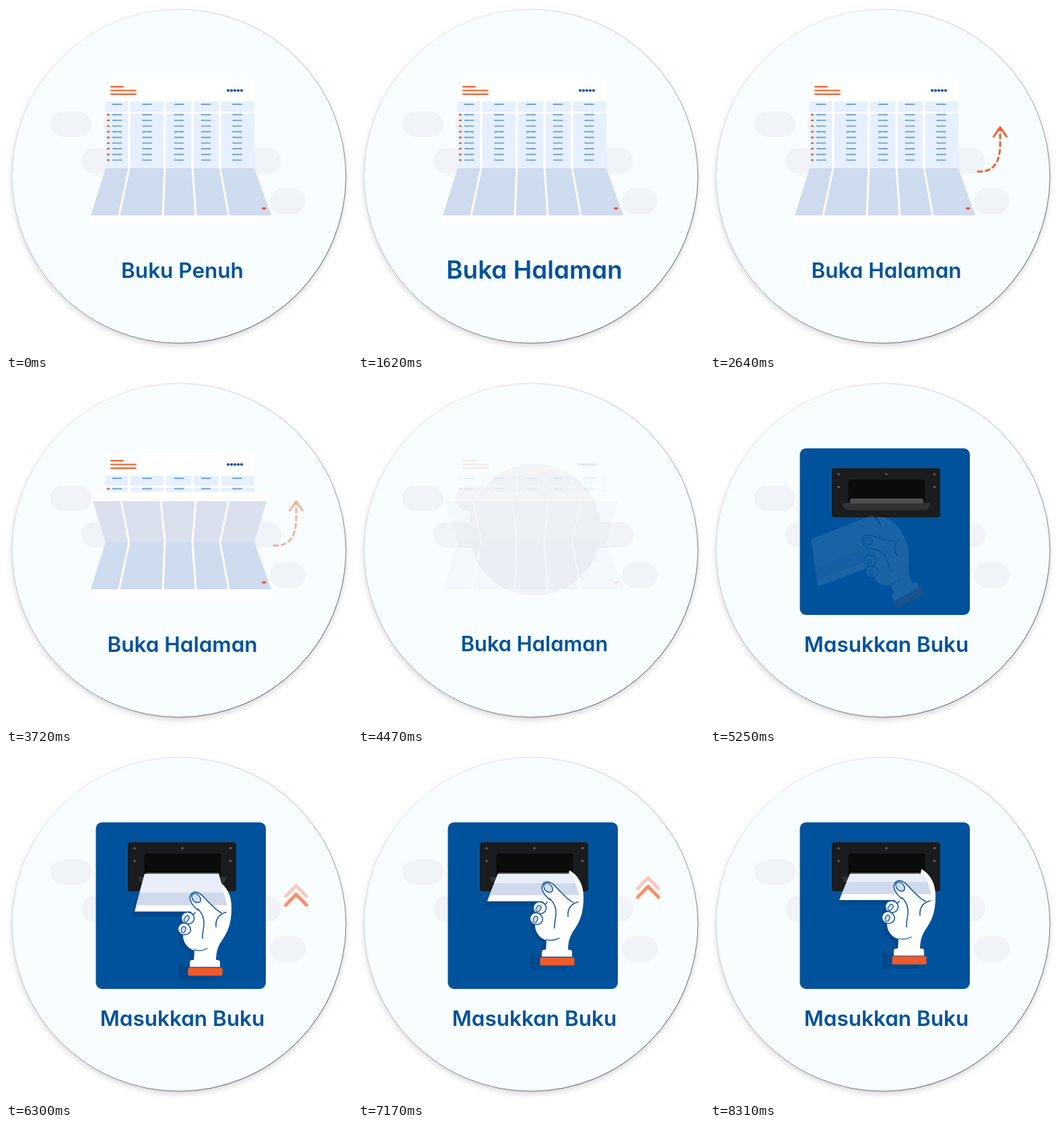
Animation of 514 by 514 pixels, one loop 9000 ms. Source, as an HTML page with a canvas:

```html
<!DOCTYPE html>
<html lang="id">
<head>
<meta charset="utf-8">
<title>Buku Penuh</title>
<style>
  html, body { margin: 0; width: 100%; height: 100%; overflow: hidden; background: #fff; }
  canvas { position: absolute; left: 0; top: 0; width: 514px; height: 514px; }
  #label {
    position: absolute; left: 262px; top: 392px; white-space: nowrap; line-height: 1;
    font: 600 31.5px Inter, "Open Sans", sans-serif;
    font-feature-settings: "cv11"; color: #00529c;
  }
</style>
</head>
<body>
<canvas id="stage" width="514" height="514"></canvas>
<div id="label"></div>
<script>
const SIZE = 514, LOOP = 9000;
const BLUE = '#00529c', ORANGE = '#f15a29', INK = '#0b4f96', DASH = '#6fa3d3';
const screen = document.getElementById('stage').getContext('2d');
const scratch = Object.assign(document.createElement('canvas'), { width: SIZE, height: SIZE }).getContext('2d');
const label = document.getElementById('label');
let g = screen;

const clamp = v => Math.max(0, Math.min(1, v));
const span = (t, a, b) => clamp((t - a) / (b - a));
const mix = (a, b, k) => a + (b - a) * k;
const mixPt = (a, b, k) => [mix(a[0], b[0], k), mix(a[1], b[1], k)];
const inOut = k => k < .5 ? 2 * k * k : 1 - 2 * (1 - k) ** 2;
const outQuad = k => 1 - (1 - k) ** 2;
const outBack = k => 1 - 3.5 * (1 - k) ** 3 + 2.5 * (1 - k) ** 2;

function box(x1, y1, x2, y2, r, color) {
  g.fillStyle = color;
  g.beginPath();
  g.roundRect(x1, y1, x2 - x1, y2 - y1, r);
  g.fill();
}
function disc(x, y, r, color) {
  g.fillStyle = color;
  g.beginPath();
  g.arc(x, y, r, 0, Math.PI * 2);
  g.fill();
}
function poly(pts, color) {
  g.fillStyle = color;
  g.beginPath();
  pts.forEach(p => g.lineTo(p[0], p[1]));
  g.closePath();
  g.fill();
}
function line(pts, color, width, cap = 'butt') {
  g.strokeStyle = color;
  g.lineWidth = width;
  g.lineCap = cap;
  g.lineJoin = 'round';
  g.beginPath();
  pts.forEach(p => g.lineTo(p[0], p[1]));
  g.stroke();
}
function path(d, fill, stroke, width = 1.5) {
  const p = new Path2D(d);
  if (fill) { g.fillStyle = fill; g.fill(p); }
  if (stroke) {
    g.strokeStyle = stroke;
    g.lineWidth = width;
    g.lineCap = g.lineJoin = 'round';
    g.stroke(p);
  }
}

// Draws a group with one common opacity.
function layer(alpha, draw) {
  if (alpha <= 0) return;
  if (alpha >= 1) return draw();
  scratch.clearRect(0, 0, SIZE, SIZE);
  g = scratch;
  draw();
  g = screen;
  g.globalAlpha = alpha;
  g.drawImage(scratch.canvas, 0, 0);
  g.globalAlpha = 1;
}

function backdrop() {
  g.fillStyle = '#fff';
  g.fillRect(0, 0, SIZE, SIZE);
  g.save();
  g.shadowColor = 'rgba(0,0,0,.16)';
  g.shadowBlur = 9;
  g.shadowOffsetY = 4;
  disc(257, 253, 248, '#f8fdff');
  g.restore();
  const rim = g.createLinearGradient(110, 60, 420, 440);
  rim.addColorStop(0, 'rgba(40,50,60,.12)');
  rim.addColorStop(.5, 'rgba(40,50,60,.4)');
  rim.addColorStop(1, 'rgba(20,25,30,.9)');
  g.strokeStyle = rim;
  g.lineWidth = .8;
  g.beginPath();
  g.arc(257, 253, 248, 0, Math.PI * 2);
  g.stroke();

  const grey = '#f0f3f7';
  box(66, 157, 127, 194.5, 18.5, grey);
  box(145, 157, 230, 194.5, 18.5, grey);
  box(112, 211, 409, 249, 19, grey);
  box(392, 271, 445, 309, 19, grey);
  disc(262.5, 222.5, 98, grey);
}

const FOLD = [183, 236, 277, 318];

function leaf(y, left, right, ends, color) {
  poly([[148, 241], [369, 241], [right, y], [left, y]], color);
  FOLD.forEach((x, i) => line([[x, 241], [ends[i], y]], '#fff', 3));
}

function book(flip) {
  box(148, 109, 369, 241, [5, 5, 0, 0], '#fff');
  g.fillStyle = '#e6f0fe';
  g.fillRect(148, 142, 221, 99);
  FOLD.forEach(x => line([[x, 142], [x, 241]], '#fff', 3.4));
  line([[148, 158.5], [369, 158.5]], '#fff', 3);

  [[120, 174], [125.5, 193], [131, 193]].forEach(([y, x]) => line([[156, y], [x, y]], ORANGE, 2, 'round'));
  for (let i = 0; i < 5; i++) disc(330 + i * 5, 125.5, 2.1, BLUE);

  for (let row = 0; row < 10; row++) {
    const y = row ? 161.5 + (row - 1) * 8.42 : 146;
    [165, 209.5, 257, 297, 343.5].forEach(x => line([[x - 6.5, y], [x + 6.5, y]], DASH, 1.9, 'round'));
    if (row) line([[151, y], [153, y]], ORANGE, 2.4, 'round');
  }

  leaf(311, 126, 394, [168, 233, 282, 331], '#cfdbee');
  box(126, 311, 394, 325.5, [0, 0, 6, 6], '#fff');
  box(380, 299, 386.5, 302.5, 1.7, ORANGE);

  if (flip > 0) {
    const k = inOut(flip), y = mix(267, 180, k), edge = y + mix(14, -14, k);
    g.globalAlpha = clamp(flip * 4);
    leaf(y, 129, 387, [171, 230, 282, 331], '#dae0ee');
    box(128, Math.min(y, edge), 388, Math.max(y, edge), 4, '#fff');
    g.globalAlpha = 1;
  }
}

function arrow() {
  g.setLineDash([6, 5.5]);
  path('M398 246 C421 247 431 232 431 206 L431 183', null, ORANGE, 3);
  g.setLineDash([]);
  line([[421.5, 194], [431, 180], [440.5, 194]], ORANGE, 3, 'round');
}

function machine() {
  box(133.5, 101.5, 386, 349, 9, BLUE);
  box(181, 131, 342, 204, 4, '#1b1c1d');
  box(205.5, 148, 319.5, 184, [4, 4, 0, 0], '#0a0c0c');
  path('M196 182.5 H328 Q326 193.5 315 193.5 H209 Q198 193.5 196 182.5Z', '#303233');
  box(208, 176, 317, 183.5, [3, 3, 0, 0], '#4c4e4f');
  [[191, 140], [262, 140], [333.5, 140], [191, 159], [333.5, 159]].forEach(([x, y]) => disc(x, y, 1.4, '#77797a'));
}

// Corners: top left, top right, bottom right, bottom left.
const TILTED = [[150, 237], [241, 201], [283, 262], [160, 307]];
const LOW = [[206, 178], [316, 178], [331, 234], [191, 234]];
const HIGH = [[208, 178], [319, 178], [332, 217], [192, 217]];
const blend = (a, b, k) => a.map((p, i) => mixPt(p, b[i], k));

function paper([tl, tr, br, bl]) {
  const h = Math.hypot(bl[0] - tl[0], bl[1] - tl[1]);
  const upTo = d => [mixPt(br, tr, d / h), mixPt(bl, tl, d / h)];
  const [r1, l1] = upTo(9.5), [r2, l2] = upTo(29);
  poly([tl, tr, br, bl], '#fff');
  poly([tl, tr, r2, l2], '#e8effb');
  poly([l2, r2, r1, l1], '#cfdaed');
}

const PALM = 'M275 220 C271 213 274 206 281 205 C288 205 292 211 300 219 C307 226 312 232 320 236 ' +
  'L334 228 C336 246 331 262 322 275 C315 285 312 293 312 308 L279 308 L280 292 C268 288 262 278 263 266 ' +
  'C258 250 266 238 276 234 L285 232Z';
const BULGE = 'M314 188 C328 196 335 210 335 228 C335 250 329 264 318 280 L304 260Z';

function handShade() {
  path(PALM, '#00498d');
  box(263, 309, 318, 333, 3, '#00498d');
}
function handFront() {
  path(PALM, '#fff');
  path('M285 232 C280 228 277 224 275 220 C271 213 274 206 281 205 C288 205 292 211 300 219 C307 226 312 232 320 236', null, INK);
  path('M285 230 C292 237 295 245 294 254 C293 264 291 270 292 274', null, INK);
  path('M312 257 C311 246 316 238 327 235', null, INK);
  path('M276 213 C275 208 280 206 284 208 C288 211 291 216 288 220 C283 222 278 220 276 213Z', '#cfdaed', INK, 1.4);
  path('M275 236 C278 240 280 238 281 235', null, INK, 1.3);
  path('M279 247 C276 254 264 255 261 247 C259 240 264 234 271 235 C277 236 281 241 279 247Z', '#fff', INK);
  path('M264 246 L267 241 C270 239 273 241 272 245 L269 249 C267 251 264 249 264 246Z', '#cfdaed', INK, 1.2);
  path('M274 263 C271 270 260 271 256 263 C254 257 258 251 265 251 C271 252 275 257 274 263Z', '#fff', INK);
  path('M260 261 L262 257 C265 255 268 257 267 261 L265 265 C262 267 260 264 260 261Z', '#cfdaed', INK, 1.2);
  path('M280 291 C289 294 295 291 299 289', null, INK, 1.3);
  box(273, 306, 318, 320, 4, '#fff');
  box(270, 317, 322.5, 330, 2.5, ORANGE);
  path('M273 317 H320 Q322 317 322 319 V328 Q322 330 320 330 H272 Q270 330 270 328 V319 Q270 317 273 317Z', null, INK, 1.2);
}

function hand(turn, lift) {
  const sheet = turn < 1 ? blend(TILTED, LOW, turn) : blend(LOW, HIGH, clamp((lift - 2 / 19) * 19 / 17));
  const dy = turn < 1 ? 2 * turn : 2 - 19 * lift;
  const pose = (draw, ox = 0, oy = 0) => {
    g.save();
    g.translate(296 + ox, 324 + dy + oy);
    g.rotate((turn - 1) * 29 * Math.PI / 180);
    g.scale(mix(.95, 1, turn), mix(.95, 1, turn));
    g.translate(-296, -324);
    draw();
    g.restore();
  };
  if (turn > 0) {
    g.globalAlpha = turn;
    poly(sheet.map(([x, y], i) => [x - 5, y + (i < 2 ? 16 : 7)]), '#00498d');
    pose(handShade, -7, 3);
    g.globalAlpha = 1;
  }
  pose(() => path(BULGE, '#fff'));
  paper(sheet);
  pose(handFront);
}

function chevrons(rise, alpha) {
  const y = 1.5 - 14.5 * rise;
  [[0, 1], [-13, .45]].forEach(([off, a]) => layer(alpha * a, () =>
    line([[415.5, 224.5 + y + off], [431, 208.5 + y + off], [446.5, 224.5 + y + off]], '#ff7347', 5, 'round')));
}

function caption(t) {
  let text = 'Masukkan Buku', k = span(t, 4700, 5090);
  if (t < 1380) {
    text = 'Buku Penuh';
    k = 1 - span(t, 900, 1380);
  } else if (t < 4600) {
    text = 'Buka Halaman';
    k = t < 3000 ? span(t, 1382, 1772) : 1 - span(t, 4130, 4600);
  }
  if (label.textContent !== text) label.textContent = text;
  label.style.transform = `translate(-50%, -50%) scale(${Math.max(0, outBack(k))})`;
}

function render(t) {
  g = screen;
  backdrop();
  layer(1 - span(t, 3720, 4590), () => book(span(t, 2800, 3600)));
  layer(inOut(span(t, 1800, 2740)) * (1 - span(t, 3450, 3950)), arrow);
  layer(outQuad(span(t, 4620, 5020)), machine);
  const lift = inOut(span(t, 5940, 7500));
  layer(span(t, 5220, 5520), () => hand(inOut(span(t, 5220, 5700)), lift));
  chevrons(lift, .8 * span(t, 5910, 6270) * (1 - span(t, 7770, 8310)));
  caption(t);
}

const start = performance.now();
function tick() {
  render((performance.now() - start) % LOOP);
  requestAnimationFrame(tick);
}
tick();
</script>
</body>
</html>
```
